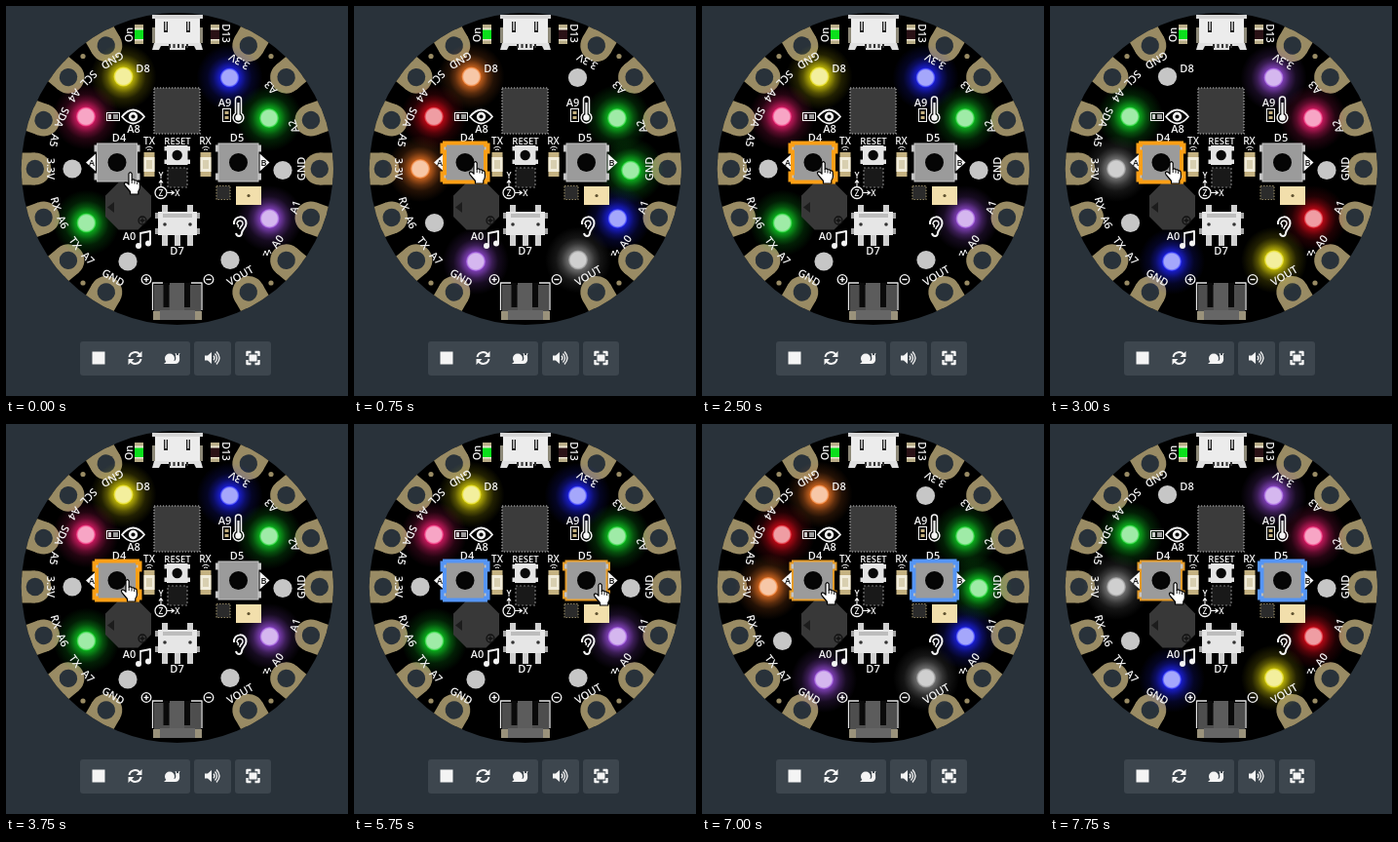
Animation of 351x400 px, one loop 8000 ms. Source, as an HTML page with a canvas:

```html
<!DOCTYPE html>
<html lang="en">
<head>
<meta charset="utf-8">
<title>Circuit board simulator</title>
<style>
html, body { margin: 0; width: 100%; height: 100%; overflow: hidden; background: #29323a; }
canvas { display: block; width: 351px; height: 400px; }
</style>
</head>
<body>
<canvas id="stage"></canvas>
<script>
const W = 351, H = 400, LOOP = 8000;
const CX = 175.8, CY = 167, R = 160;
const BG = '#29323a', GOLD = '#998b64', WHITE = '#f4f4f4';
const FONT = '"Open Sans", "Noto Sans", sans-serif';
const canvas = document.getElementById('stage');
const g = canvas.getContext('2d');
const scale = window.devicePixelRatio || 1;
canvas.width = W * scale;
canvas.height = H * scale;

// Left column top to bottom, then right column.
const LEDS = [[120.5, 72.5], [82, 113.5], [68, 167], [82.5, 222.5], [125, 262],
              [229.5, 73.5], [270, 115], [284, 168.5], [270.5, 218], [230, 260.5]];
const COLORS = {
  y: [225, 215, 10], p: [235, 30, 110], g: [15, 205, 35], b: [30, 35, 245],
  v: [150, 75, 215], w: [135, 135, 135], r: [215, 10, 25], o: [235, 115, 35]
};
const PATTERNS = { A: 'yp.g.bg.v.', B: '.gw.bvp.ry', C: 'oro.v.ggbw' };
const LIGHTS = [[0, 'A'], [500, 'B'], [750, 'C'], [1250, 'A'], [1750, 'B'], [2000, 'C'],
                [2500, 'A'], [3000, 'B'], [3250, 'C'], [3750, 'A'], [6500, 'B'],
                [7000, 'C'], [7250, 'A'], [7750, 'B']];
// time, x, y, shape
const POINTER = [[0, 121, 170, 'hand'], [250, 118, 159, 'hand'], [5000, 184, 166, 'arrow'],
                 [5250, 248, 166, 'hand'], [5500, 247, 165, 'hand'], [5750, 246, 163, 'hand'],
                 [6250, 122, 162, 'hand']];
// time, outline of button A, outline of button B
const OUTLINES = [[0, '', ''], [250, 'both', ''], [5000, 'focus', ''],
                  [5250, 'focus', 'hover'], [6250, 'hover', 'focus']];
const STROKES = { both: ['#fb9f16', 4], hover: ['#e39a28', 2], focus: ['#5595f5', 4] };

const at = (track, t) => track.filter(k => k[0] <= t).pop();

function rect(x, y, w, h, color) {
  g.fillStyle = color;
  g.fillRect(x, y, w, h);
}

function box(x, y, w, h, r, color) {
  g.beginPath();
  g.roundRect(x, y, w, h, r);
  g.fillStyle = color;
  g.fill();
}

function dot(x, y, r, color) {
  g.beginPath();
  g.arc(x, y, r, 0, 7);
  g.fillStyle = color;
  g.fill();
}

function ring(x, y, r, color, width) {
  g.beginPath();
  g.arc(x, y, r, 0, 7);
  g.strokeStyle = color;
  g.lineWidth = width;
  g.stroke();
}

function frame(x, y, w, h, color, width, dash = []) {
  g.setLineDash(dash);
  g.strokeStyle = color;
  g.lineWidth = width;
  g.strokeRect(x, y, w, h);
  g.setLineDash([]);
}

// Path data placed at x, y, with optional fill and stroke.
function shape(d, x, y, fill, stroke, width = 1.3, join = 'round') {
  const path = new Path2D(d);
  g.save();
  g.translate(x, y);
  if (fill) { g.fillStyle = fill; g.fill(path); }
  if (stroke) {
    g.strokeStyle = stroke;
    g.lineWidth = width;
    g.lineJoin = join;
    g.stroke(path);
  }
  g.restore();
}

function label(text, x, y, size = 11, turn = 0, color = WHITE) {
  g.save();
  g.translate(x, y);
  g.rotate(turn);
  g.font = `600 ${size}px ${FONT}`;
  g.textAlign = 'center';
  g.textBaseline = 'alphabetic';
  g.fillStyle = color;
  g.fillText(text, 0, size * 0.36);
  g.restore();
}

// Label on the rim, its top facing the centre of the board.
function rimLabel(text, degrees, radius) {
  const a = degrees * Math.PI / 180;
  label(text, CX + radius * Math.cos(a), CY + radius * Math.sin(a), 11, a - Math.PI / 2);
}

function drawPads() {
  g.save();
  g.beginPath();
  g.arc(CX, CY, R, 0, 7);
  g.clip();
  for (const side of [0, 180]) {
    for (let k = -3; k <= 3; k++) {
      g.save();
      g.translate(CX, CY);
      g.rotate((side + k * 20) * Math.PI / 180);
      rect(146, -16.5, 20, 33, GOLD);
      dot(146, 0, 16.5, GOLD);
      dot(146, 0, 9.2, BG);
      g.restore();
    }
  }
  g.restore();
  for (const x of [79, 272]) for (const y of [51.5, 284]) dot(x, y, 2.6, GOLD);
}

function drawRimLabels() {
  [['GND', 239], ['SCL', 225.5], ['A4', 215.5], ['SDA', 204], ['A5', 193], ['3.3V', 180],
   ['RX', 164], ['A6', 155], ['TX', 144], ['A7', 135], ['GND', 120.5]]
    .forEach(([s, a]) => rimLabel(s, a, 129.5));
  [['3.3V', -60], ['A3', -41], ['A2', -20], ['GND', 0], ['A1', 18], ['A0', 36], ['VOUT', 59.5]]
    .forEach(([s, a]) => rimLabel(s, a, 127));
  shape('M-4 2L-2-3L0 2L2-4L4 0', 268, 254, null, WHITE, 1);
}

function drawUsb() {
  for (const x of [150, 194]) rect(x, 22, 8, 16, '#8c8877');
  rect(153, 9, 46, 29, '#ececec');
  rect(150, 9, 52, 4, '#d6d6d6');
  for (const x of [164, 187]) {
    rect(x - 2, 16, 4, 11, '#222');
    rect(x - 0.8, 16, 1.6, 9, '#cfcfcf');
  }
  shape('M152 38H200L202 45H195L193 41H184V45H168V41H159L157 45H150Z', 0, 0, '#e0e0e0');
  for (let x = 167; x < 186; x += 4.5) rect(x, 39, 2, 4, '#333');
}

function drawStatusLed(x, color) {
  rect(x - 4.5, 19, 9, 20, '#b9ad88');
  rect(x - 4.5, 22.5, 9, 13, '#ece6d2');
  rect(x - 4.5, 24.5, 9, 9.5, color);
}

function drawSignalLed(x) {
  rect(x - 5.5, 150, 11, 25, '#c4b180');
  rect(x - 5.5, 155, 11, 15, '#f2eddb');
  rect(x - 3, 158, 6, 9, '#d8cfb0');
  for (const r of [3, 5.5]) {
    g.beginPath();
    g.arc(x, 150, r, -2.3, -0.85);
    g.strokeStyle = WHITE;
    g.lineWidth = 1;
    g.stroke();
  }
}

function drawChips() {
  rect(152, 84, 47, 47, '#3b3b3b');
  frame(152, 84, 47, 47, '#8d8d8d', 1.6, [1.2, 1.8]);
  rect(166, 166, 20, 20, '#191919');
  frame(166, 166, 20, 20, '#777', 1.2, [2, 2]);
  rect(216, 184.5, 14, 14, '#2b2b2b');
  frame(216, 184.5, 14, 14, '#8b805e', 1.2, [1.5, 1.5]);
  rect(236, 185, 26, 19, '#f2dfac');
  dot(249, 194.5, 1.6, '#5d502f');
}

function drawReset() {
  for (const y of [144, 157.5]) rect(162.5, y, 26.5, 4.5, '#e2e2e2');
  rect(165, 143, 21.5, 20, '#e4e4e4');
  dot(175.7, 153, 5.2, '#080808');
}

function drawSpeaker() {
  shape('M115.5 181H135.5L149 194.5V216L135.5 229.5H115.5L102 216V194.5Z', 0, 0, '#383838');
  shape('M111 201v11l-7-5.5z', 0, 0, '#1c1c1c');
  ring(140, 220, 4, '#111', 1.3);
  shape('M-2.5 0h5M0-2.5v5', 140, 220, null, '#111', 1.3);
}

function drawSwitch() {
  for (const x of [160, 186]) rect(x, 204, 6, 8, '#d0d0d0');
  for (const x of [160, 173, 186]) rect(x, 235, 6, 11, '#d0d0d0');
  for (const x of [153, 195]) {
    rect(x, 212, 4, 6, '#a5a5a5');
    rect(x, 228, 4, 6, '#a5a5a5');
  }
  rect(156, 211, 40, 24, '#e6e6e6');
  rect(161, 213, 30, 4, '#bdbdbd');
  for (const x of [163, 189]) dot(x, 224, 1.8, '#333');
}

function drawBattery() {
  rect(152, 286, 48, 34, '#4e4e4e');
  rect(168, 284, 15, 36, '#5c5c5c');
  for (const x of [161.5, 183]) rect(x, 284, 6, 25, '#0a0a0a');
  rect(158, 312, 36, 10, '#666');
  for (const x of [151, 194]) rect(x, 313, 7, 9, '#9a927b');
  shape('M150.5 312V284H161M190 284H201V312', 0, 0, null, '#e5e5e5', 1.3);
  for (const x of [144, 208]) {
    ring(x, 280.5, 4.8, WHITE, 1.3);
    rect(x - 2.6, 279.8, 5.2, 1.4, WHITE);
  }
  rect(143.3, 277.9, 1.4, 5.2, WHITE);
}

function drawSymbols() {
  // eye and light sensor
  shape('M-11.5 0Q0-14 11.5 0Q0 14-11.5 0Z', 130.5, 113.5, null, WHITE, 1.8);
  ring(130.5, 113.5, 3.4, WHITE, 2.6);
  frame(103.5, 109.5, 13, 8, WHITE, 1);
  rect(105, 111, 3, 5, '#ccc');
  rect(110, 111, 5, 5, '#999');
  // thermometer and its sensor
  shape('M-3-10a3 3 0 0 1 6 0V4a5.4 5.4 0 1 1-6 0Z', 238.5, 106, null, WHITE, 1.5);
  rect(237.4, 99, 2.2, 14, WHITE);
  dot(238.5, 114.5, 3.2, WHITE);
  frame(222.5, 105.5, 8, 13, WHITE, 1);
  rect(224.5, 108, 4, 3, '#c4b180');
  rect(224.5, 113, 4, 3, '#c4b180');
  // ear
  shape('M-6-2C-7-12 7-12 6.5-3C6.5 2 2 3 2 7C1.5 11-3 11-4 7', 240, 226, null, WHITE, 2);
  shape('M-3-2C-3-7 3.5-7 3-2.5C2.5 0 0 0 0 3M-3-2q2 0 1 3', 240, 226, null, WHITE, 1.5);
  // notes
  shape('M138 233L148 231V243', 0, 0, null, WHITE, 2);
  shape('M138 232V246', 0, 0, null, WHITE, 1.6);
  dot(136, 246, 3, WHITE);
  dot(146, 243.5, 3, WHITE);
  // axes
  ring(159, 191.5, 6, WHITE, 1.3);
  label('Z', 159, 191.5, 8.5);
  shape('M159 185V179M157 181.5L159 178.5L161 181.5M165 191.5H172M169.5 189.5L172.5 191.5L169.5 193.5',
    0, 0, null, WHITE, 1.1);
  label('Y', 159, 173.5, 8.5);
  label('X', 176, 192, 8.5);
}

function drawLabels() {
  label('On', 126.5, 29.5, 11, -Math.PI / 2);
  label('D13', 226, 28, 10.5, Math.PI / 2);
  label('D8', 140.5, 64);
  label('A8', 131, 126);
  label('A9', 224.5, 99);
  label('D4', 116, 135.5);
  label('D5', 237, 135.5);
  label('TX', 147, 138.5, 10);
  label('RX', 204.5, 138.5, 10);
  label('RESET', 176, 138.5, 9.5);
  label('A0', 126.5, 236.5);
  label('D7', 175.5, 251.5);
}

const BUTTON = 'M-21-20H21V-18H23.5V-11H21V11H23.5V18H21V20H-21V18H-23.5V11H-21V-11H-23.5V-18H-21Z';

function drawButton(x, name, dir, outline) {
  const y = 160.5, tip = x + dir * 32, base = x + dir * 22;
  shape(`M${tip} ${y}L${base} ${y - 9}V${y + 9}Z`, 0, 0, WHITE);
  label(name, x + dir * 26, y, 9, 0, '#111');
  shape(BUTTON, x, y, '#c4c4c4');
  rect(x - 20, y - 19, 40, 38, '#9b9b9b');
  dot(x, y, 9.5, '#050505');
  if (outline) shape(BUTTON, x, y, null, ...STROKES[outline], 'miter');
}

// A pale core that turns to full colour at the edge, then fades out.
function drawLed([x, y], key) {
  if (key === '.') return dot(x, y, 9.6, '#c6c6c6');
  const c = COLORS[key];
  const reach = 34;
  const pale = `rgb(${c.map(v => Math.round(v + (255 - v) * 0.6))})`;
  const glow = g.createRadialGradient(x, y, 0, x, y, reach);
  [[8, 0.9], [12, 0.68], [17, 0.38], [23, 0.15], [reach, 0]]
    .forEach(([r, a]) => glow.addColorStop(r / reach, `rgba(${c},${a})`));
  dot(x, y, reach, glow);
  const core = g.createRadialGradient(x, y, 5.5, x, y, 10);
  core.addColorStop(0, pale);
  core.addColorStop(0.5, pale);
  core.addColorStop(1, `rgb(${c})`);
  dot(x, y, 10, core);
}

function drawToolbar() {
  const tone = '#3d464e';
  box(76, 344, 113, 35, 3, tone);
  box(193, 344, 38, 35, 3, tone);
  box(235, 344, 37, 35, 3, tone);
  rect(88.5, 354.5, 13, 13, WHITE);
  // restart
  shape('M-6-1A6 6 0 0 1 5-3M6 1A6 6 0 0 1-5 3', 132.5, 361, null, WHITE, 2);
  shape('M7-7V-1H1ZM-7 7V1H-1Z', 132.5, 361, WHITE);
  // snail
  dot(168, 361.5, 5, WHITE);
  shape('M-8 6Q-5 3-4 3H3Q5 2 4-2Q6-4 8-2Q9 6 4 6Z', 170, 361, WHITE);
  shape('M5-2L4-5M7-2L8-5', 170, 361, null, WHITE, 1);
  // sound
  shape('M-7-2.5H-4L0-6V6L-4 2.5H-7Z', 211, 361, WHITE);
  shape('M2-2.3Q4 0 2 2.3M3.5-4.5Q7.5 0 3.5 4.5M5-6.5Q11 0 5 6.5', 211, 361, null, WHITE, 1.3);
  // full screen
  shape('M-6-2V-6H-2M2-6H6V-2M6 2V6H2M-2 6H-6V2', 253.5, 361, null, WHITE, 2.4);
  rect(249.5, 357.5, 8, 7, WHITE);
}

const HAND = 'M5 2Q6.6-.6 8.2 2V8.3Q10.3 7.2 11 9Q13 8.2 13.6 10Q15.8 9.5 16.2 11.5L16.4 15.5' +
  'Q16.4 18 14.8 20V23H6.5V20.5L1 13.8Q-.4 11 1.8 10.8Q3.2 10.8 5 13.2Z';
const ARROW = 'M0 0V16L3.8 12.5L6.3 18.5L8.8 17.4L6.3 11.6H11.5Z';

function drawPointer([, x, y, kind]) {
  shape(kind === 'hand' ? HAND : ARROW, x, y, '#fff', '#000', 1.2);
  if (kind === 'hand') shape('M8.2 8V12M11 9.5V12.5M13.6 10.5V13', x, y, null, '#000', 0.9);
}

function draw(t) {
  g.setTransform(scale, 0, 0, scale, 0, 0);
  rect(0, 0, W, H, BG);
  dot(CX, CY, R, '#000');
  drawPads();
  const pattern = PATTERNS[at(LIGHTS, t)[1]];
  LEDS.forEach((p, i) => drawLed(p, pattern[i]));
  drawRimLabels();
  drawUsb();
  drawStatusLed(136.5, '#0be01c');
  drawStatusLed(214.5, '#2a1216');
  drawChips();
  drawSignalLed(147);
  drawSignalLed(205);
  drawReset();
  drawSpeaker();
  drawSwitch();
  drawBattery();
  drawSymbols();
  drawLabels();
  const [, a, b] = at(OUTLINES, t);
  drawButton(114, 'A', -1, a);
  drawButton(238.5, 'B', 1, b);
  drawToolbar();
  drawPointer(at(POINTER, t));
}

const start = performance.now();
function tick() {
  draw((performance.now() - start) % LOOP);
  requestAnimationFrame(tick);
}
tick();
</script>
</body>
</html>
```
